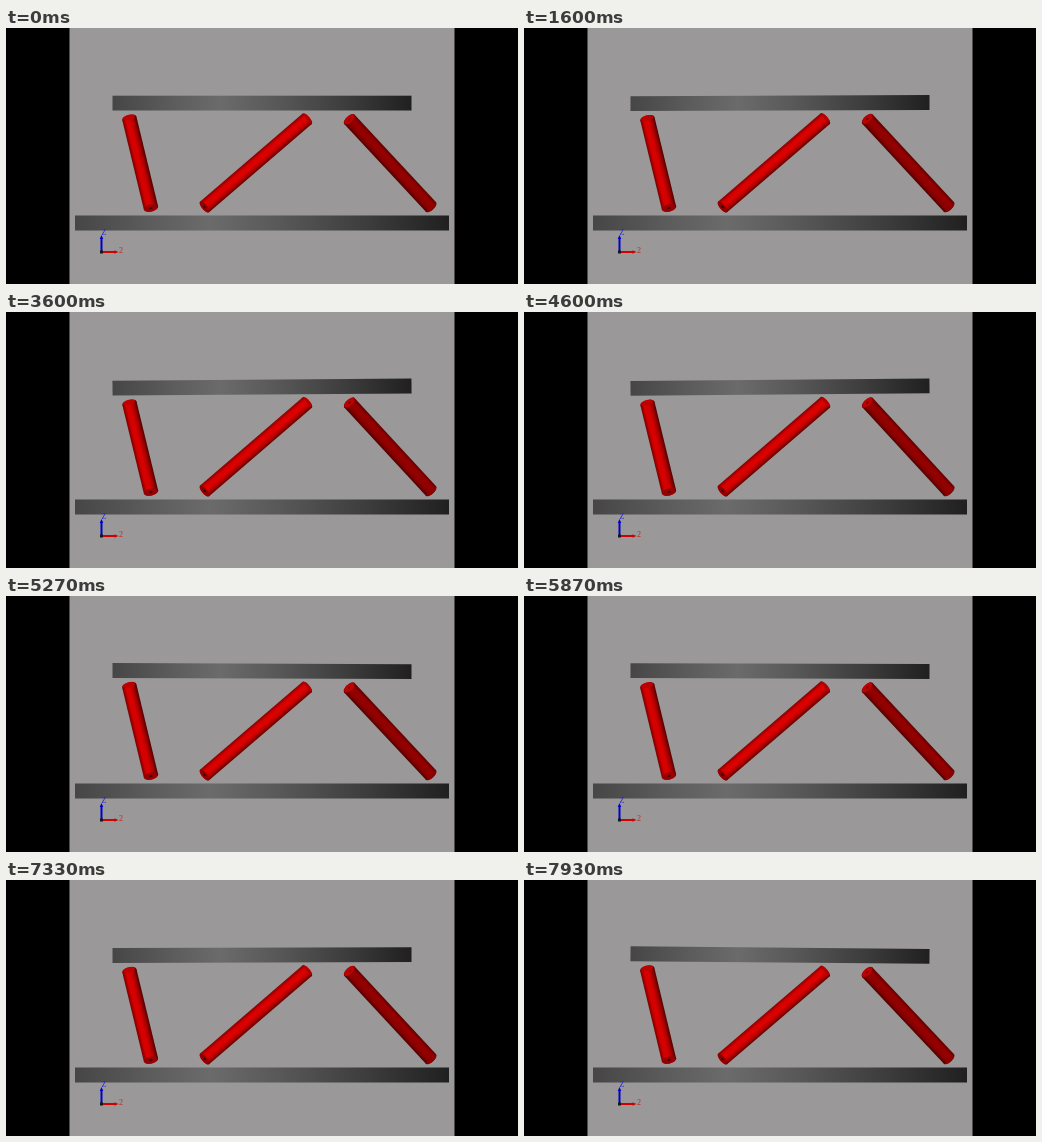
These frames come from a looping animation (512 px wide and 256 px high, 8000 ms). An HTML page with a canvas:

```html
<!DOCTYPE html>
<html lang="en">
<head>
<meta charset="utf-8">
<title>Rocking platform</title>
<style>
  html, body { margin: 0; width: 100%; height: 100%; overflow: hidden; background: #000; }
  canvas { display: block; width: 512px; height: 256px; }
</style>
</head>
<body>
<canvas width="512" height="256"></canvas>
<script>
const ctx = document.querySelector('canvas').getContext('2d');
const LOOP = 8000, STEP = 200 / 3;
const PERIOD = 980, PEAK = 4600, HALF_SPAN = 149.5;
const PIVOT = { x: 256, y: 75 };

const legs = [
  { low: [145, 180], high: [123.3, 90.3], r: 7.3, cap: 3.6,
    tones: ['#780000', '#d40000', '#d80000', '#a80000', '#500000'],
    lowCap: '#960000', highCap: '#bd0000', hole: 'low' },
  { low: [198.5, 179], high: [301.2, 90.8], r: 7, cap: 2.6,
    tones: ['#850000', '#d60000', '#df0000', '#b50000', '#5d0000'],
    lowCap: '#900000', highCap: '#b00000', hole: 'low' },
  { low: [425, 179], high: [343.3, 91.3], r: 7, cap: 3.2,
    tones: ['#510000', '#850000', '#950000', '#930000', '#600000'],
    lowCap: '#8d0000', highCap: '#bd0000', hole: 'high' }
];

function gradient(x0, y0, x1, y1, stops) {
  const g = ctx.createLinearGradient(x0, y0, x1, y1);
  for (const [at, color] of stops) g.addColorStop(at, color);
  return g;
}

function plate(x, y, w, h) {
  ctx.fillStyle = gradient(x, 0, x + w, 0, [
    [0, '#464646'], [0.2, '#5c5c5c'], [0.36, '#6b6b6b'],
    [0.55, '#585858'], [0.78, '#3d3d3d'], [1, '#202020']
  ]);
  ctx.fillRect(x, y, w, h);
}

function oval(x, rx, ry, fill) {
  ctx.beginPath();
  ctx.ellipse(x, 0, rx, ry, 0, 0, Math.PI * 2);
  ctx.fillStyle = fill;
  ctx.fill();
}

// Position of a platform point after the platform turns.
function turned([x, y], angle) {
  const dx = x - PIVOT.x, dy = y - PIVOT.y;
  const c = Math.cos(angle), s = Math.sin(angle);
  return [PIVOT.x + dx * c - dy * s, PIVOT.y + dx * s + dy * c];
}

function drawLeg(leg, angle) {
  const [x, y] = leg.low;
  const [hx, hy] = turned(leg.high, angle);
  const length = Math.hypot(hx - x, hy - y);
  const { r, cap } = leg;
  const shade = gradient(0, -r, 0, r, leg.tones.map((c, i) => [i / 4, c]));
  ctx.save();
  ctx.translate(x, y);
  ctx.rotate(Math.atan2(hy - y, hx - x));
  oval(0, cap, r, shade);
  oval(length, cap, r, shade);
  ctx.fillRect(0, -r, length, r * 2);
  if (leg.hole === 'low') {
    oval(0, cap, r - 0.6, leg.lowCap);
    oval(0, 0.9, 1.5, '#330000');
    oval(length + 0.8, cap - 1, r - 1.2, leg.highCap);
  } else {
    oval(length, cap, r - 0.6, leg.highCap);
    oval(length, 0.8, 1.4, '#650000');
    oval(-0.8, cap - 1, r - 1.2, leg.lowCap);
  }
  ctx.restore();
}

function arrow(x, y, angle, length, color) {
  ctx.save();
  ctx.translate(x, y);
  ctx.rotate(angle);
  ctx.fillStyle = color;
  ctx.fillRect(0, -1, length - 3, 2);
  ctx.beginPath();
  ctx.moveTo(length - 4, -1.8);
  ctx.lineTo(length, 0);
  ctx.lineTo(length - 4, 1.8);
  ctx.fill();
  ctx.restore();
}

function drawAxes() {
  arrow(95.5, 224, -Math.PI / 2, 17, '#0000c8');
  arrow(95.5, 224, 0, 17, '#d00000');
  ctx.fillStyle = '#181818';
  ctx.fillRect(94, 222.5, 3, 3);
  ctx.font = '8px "Liberation Serif", serif';
  ctx.fillStyle = '#2424d8';
  ctx.fillText('Z', 95.5, 206.5);
  ctx.fillStyle = '#cc2020';
  ctx.fillText('2', 113, 225);
}

function tilt(t) {
  const swing = 1.9 * (1 - Math.exp(-t / 4000));
  return -swing / HALF_SPAN * Math.cos((t - PEAK) / PERIOD * Math.PI * 2);
}

function draw(t) {
  const angle = tilt(t);
  ctx.fillStyle = '#000';
  ctx.fillRect(0, 0, 512, 256);
  ctx.fillStyle = '#9a9899';
  ctx.fillRect(63.5, 0, 385, 256);

  plate(69, 187.5, 374, 15);
  ctx.save();
  ctx.translate(PIVOT.x, PIVOT.y);
  ctx.rotate(angle);
  plate(-HALF_SPAN, -7.3, HALF_SPAN * 2, 14.8);
  ctx.restore();

  for (const leg of legs) drawLeg(leg, angle);
  drawAxes();
}

const start = performance.now();
function tick() {
  const t = Math.max(0, performance.now() - start) % LOOP;
  draw(Math.floor((t + 4) / STEP) * STEP % LOOP);
  requestAnimationFrame(tick);
}
tick();
</script>
</body>
</html>
```
